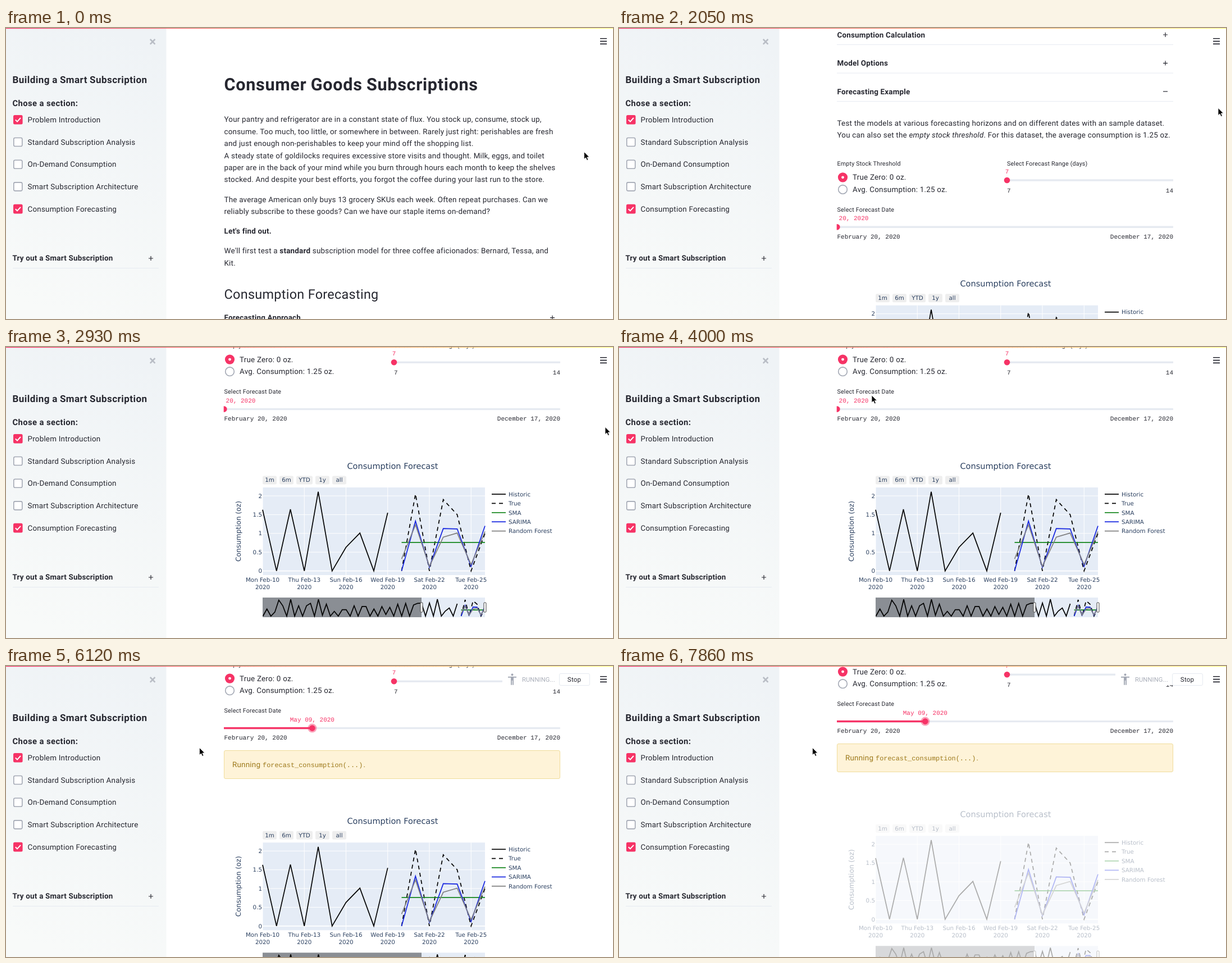
These frames come from a looping animation (1081 px wide and 518 px high, 8 s). An HTML page:

```html
<!DOCTYPE html>
<html lang="en">
<head>
<meta charset="utf-8">
<title>Consumer Goods Subscriptions</title>
<style>
  html, body { margin: 0; width: 100%; height: 100%; overflow: hidden; background: #fff; }
  svg { display: block; width: 1081px; height: 518px; }
  text { font: 13.4px Roboto, sans-serif; letter-spacing: .0165em; fill: #262730; text-rendering: geometricPrecision; white-space: pre; }
  .title { font-size: 30.6px; font-weight: 700; letter-spacing: .022em; word-spacing: -.03em; }
  .section { font-size: 23.4px; letter-spacing: .013em; }
  .side { font-size: 17px; font-weight: 700; letter-spacing: .0275em; word-spacing: -.03em; }
  .choose { font-size: 14.8px; font-weight: 700; letter-spacing: .0275em; }
  .strong { font-weight: 600; }
  .label { font-size: 10.7px; }
  .mono { font: 11px "Liberation Mono", monospace; letter-spacing: 0; }
  .code { font: 11.9px "Liberation Mono", monospace; letter-spacing: 0; }
  .pink { fill: #f63366; }
  .alert { fill: #926c05; fill-opacity: .9; }
  .status { font-size: 11.2px; letter-spacing: .01em; fill: #a9aeb9; }
  .stop { font-size: 11.5px; }
  .plot { font: 10.3px "DejaVu Sans", sans-serif; letter-spacing: 0; fill: #2a3f5f; }
  .axis { font-size: 12.2px; }
  .chart { font-size: 14.5px; }
  .mid { text-anchor: middle; }
  .end { text-anchor: end; }
  path, polyline { fill: none; }
</style>
</head>
<body>
<svg viewBox="0 0 1081 518" id="stage"></svg>
<script>
const LOOP = 8000;
const INK = '#262730', PINK = '#f63366', GREY = '#a3a8b4', RULE = '#e6eaf1';

// Drawing helpers
const text = (x, y, str, cls = '', attrs = '') => `<text x="${x}" y="${y}" class="${cls}" ${attrs}>${str}</text>`;
const rect = (x, y, w, h, fill, attrs = '') => `<rect x="${x}" y="${y}" width="${w}" height="${h}" fill="${fill}" ${attrs}/>`;
const circle = (x, y, r, fill, attrs = '') => `<circle cx="${x}" cy="${y}" r="${r}" fill="${fill}" ${attrs}/>`;
const path = (d, stroke, width, attrs = '') => `<path d="${d}" stroke="${stroke}" stroke-width="${width}" ${attrs}/>`;
const group = (id, body, attrs = '') => `<g id="${id}" ${attrs}>${body}</g>`;
const lines = (x, y, rows) => rows.map((row, i) => text(x, y + i * 21.45, row)).join('');
const plus = (x, y) => path(`M${x - 4} ${y}h8m-4 -4v8`, INK, 1.2);
const rule = (x, y, w) => path(`M${x} ${y}h${w}`, RULE, 1);

function expander(y, name, open) {
  const sign = open ? path(`M969 ${y - 4.6}h8`, INK, 1.2) : plus(973, y - 4.6);
  return text(388.5, y, name, 'strong') + sign + rule(388, y + 13, 599);
}

function checkbox(row, name, checked) {
  const y = 155 + row * 39.7;
  const box = checked
    ? rect(13, y, 16.6, 16.6, PINK, 'rx="2.5"') + path(`M16.8 ${y + 8.4}l3.2 3.2 6 -6.6`, '#fff', 2)
    : rect(13.8, y + .8, 15, 15, '#fff', `rx="2.3" stroke="${GREY}" stroke-width="1.6"`);
  return box + text(38.5, y + 13, name);
}

// Chart data: one value per day, day 0 is Feb 10
const earlier = [0, .9, 0, .5, 2, 1.3, 0, 2.1, 0, 1.3, 0, 1.3, 1.6, 0, 2.1, .1, 1.5, 0, .6, 0,
  .8, .8, 0, 1.3, 0, 1.2, 1.2, 0, .9, 0, 1.2, .2, 1.1, 0, 1.5, 0, 1.6, 0, 1.4, 1.6];
const series = [
  { name: 'Historic', color: '#000', start: 0, values: [1.63, 0, 1.64, 0, 2.11, 0, .63, 1.01, 0, 1.55] },
  { name: 'True', color: '#000', dash: '7 6', start: 10, values: [0, 2.05, 0, 1.9, 1.5, 0, 1] },
  { name: 'SMA', color: '#14861c', start: 10, values: Array(7).fill(.76) },
  { name: 'SARIMA', color: '#1424e0', start: 10, values: [0, 1.33, .1, 1.13, 1.12, .12, 1.2] },
  { name: 'Random Forest', color: '#808080', start: 10, values: [.32, 1.23, .12, .9, 1.01, .17, 1.05] },
];
const stroke = s => `stroke="${s.color}" stroke-width="1.7" stroke-dasharray="${s.dash || 'none'}"`;

function curve(s, values, start, x0, dx, y0, dy) {
  const points = values.map((v, i) => `${x0 + (start + i) * dx},${y0 - v * dy}`).join(' ');
  return `<polyline points="${points}" ${stroke(s)}/>`;
}

function chart() {
  let out = text(688.5, 216.8, 'Consumption Forecast', 'plot chart mid');
  [['1m', 457, 25], ['6m', 487, 25], ['YTD', 517, 29], ['1y', 551, 25], ['all', 581, 25]].forEach(([name, x, w]) => {
    out += rect(x, 229.5, w, 15, '#eee', 'rx="2.5"') + text(x + w / 2, 240.3, name, 'plot mid');
  });
  out += rect(457, 250, 396, 156, '#e5ecf6');
  ['Mon Feb-10', 'Thu Feb-13', 'Sun Feb-16', 'Wed Feb-19', 'Sat Feb-22', 'Tue Feb-25'].forEach((day, i) => {
    const x = 457 + i * 74.25;
    out += path(`M${x} 250v156`, '#fff', 1) + text(x, 418, day, 'plot mid') + text(x, 431, '2020', 'plot mid');
  });
  for (let v = 0; v <= 2; v += .5) {
    const y = 398.6 - v * 66.8;
    out += path(`M457 ${y}h396`, '#fff', v ? 1 : 1.7) + text(456, y + 3.7, v, 'plot end');
  }
  out += text(0, 0, 'Consumption (oz)', 'plot axis mid', 'transform="translate(418 328) rotate(-90)"');
  series.forEach((s, i) => {
    const y = 262 + i * 16.4;
    out += curve(s, s.values, s.start, 457, 24.75, 398.6, 66.8);
    out += `<path d="M865 ${y}h25" ${stroke(s)}/>` + text(895, y + 3.8, s.name, 'plot');
  });
  // Range slider
  out += rect(457, 446, 396, 35, '#e5ecf6');
  series.forEach((s, i) => {
    out += i ? curve(s, s.values, s.start, 740, 7.06, 479, 14.2)
             : curve(s, earlier.concat(s.values), -40, 740, 7.06, 479, 14.2);
  });
  out += rect(457, 446, 283, 35, '#000', 'fill-opacity=".4"');
  [740, 853].forEach(x => out += rect(x - 2, 455, 4, 17, '#fff', 'rx="1" stroke="#444" stroke-width="1"'));
  return out;
}

const intro =
  text(388.5, 111.3, 'Consumer Goods Subscriptions', 'title') +
  lines(388.5, 167.2, [
    'Your pantry and refrigerator are in a constant state of flux. You stock up, consume, stock up,',
    'consume. Too much, too little, or somewhere in between. Rarely just right: perishables are fresh',
    'and just enough non-perishables to keep your mind off the shopping list.',
    'A steady state of goldilocks requires excessive store visits and thought. Milk, eggs, and toilet',
    'paper are in the back of your mind while you burn through hours each month to keep the shelves',
    'stocked. And despite your best efforts, you forgot the coffee during your last run to the store.']) +
  lines(388.5, 309.6, [
    'The average American only buys 13 grocery SKUs each week. Often repeat purchases. Can we',
    'reliably subscribe to these goods? Can we have our staple items on-demand?']) +
  text(388.5, 366.2, "Let's find out.", 'strong') +
  lines(388.5, 401.4, [
    'We\'ll first test a <tspan class="strong">standard</tspan> subscription model for three coffee aficionados: Bernard, Tessa, and',
    'Kit.']) +
  text(388.5, 482, 'Consumption Forecasting', 'section') +
  expander(520.3, 'Forecasting Approach');

const example =
  expander(16.6, 'Consumption Calculation') +
  expander(67.2, 'Model Options') +
  expander(117.6, 'Forecasting Example', true) +
  lines(388.5, 174, [
    'Test the models at various forecasting horizons and on different dates with an sample dataset.',
    'You can also set the <tspan font-style="italic">empty stock threshold</tspan>. For this dataset, the average consumption is 1.25 oz.']) +
  text(388.5, 244.5, 'Empty Stock Threshold', 'label') +
  circle(398.5, 265.8, 8.6, PINK) + circle(398.5, 265.8, 2.4, '#fff') +
  text(416, 270.4, 'True Zero: 0 oz.') +
  circle(398.5, 287.4, 7.8, '#fff', `stroke="${GREY}" stroke-width="1.6"`) +
  text(416, 292, 'Avg. Consumption: 1.25 oz.') +
  text(691, 244.5, 'Select Forecast Range (days)', 'label') +
  text(691, 259, '7', 'mono pink mid') +
  rect(691, 269.3, 296, 3.4, RULE) + circle(691, 271, 5.3, PINK) +
  text(691, 292.6, '7', 'mono') + text(987, 292.6, '14', 'mono end') +
  text(388.5, 327, 'Select Forecast Date', 'label') +
  `<g clip-path="url(#column)">` +
    rect(388, 352.6, 599, 3.4, RULE, 'rx="1"') + rect(388, 352.6, 0, 3.4, PINK, 'id="fill"') +
    circle(388, 354.3, 8, PINK, 'id="halo" fill-opacity=".45"') + circle(388, 354.3, 5.3, PINK, 'id="thumb"') +
    text(388, 342.4, '', 'mono pink mid', 'id="date"') +
  '</g>' +
  text(388.5, 375, 'February 20, 2020', 'mono') + text(987, 375, 'December 17, 2020', 'mono end') +
  group('alert',
    rect(388.5, 394.2, 598, 50, '#fef3d8', 'rx="2.5" stroke="#f0dc9a"') +
    text(403, 424, 'Running', 'alert') +
    text(457, 424, 'forecast_consumption(...)', 'code alert') + text(636.5, 424, '.', 'alert')) +
  group('chart', chart());

const sidebar =
  rect(0, 0, 285.5, 518, 'url(#shade)') +
  path('M256.8 20l8.6 8.8m0 -8.8l-8.6 8.8', '#b9bdc5', 2.6) +
  text(11.5, 97.6, 'Building a Smart Subscription', 'side') +
  text(11.5, 138.6, 'Chose a section:', 'choose') +
  ['Problem Introduction', 'Standard Subscription Analysis', 'On-Demand Consumption',
    'Smart Subscription Architecture', 'Consumption Forecasting']
    .map((name, i) => checkbox(i, name, i % 4 === 0)).join('') +
  text(11.5, 414.3, 'Try out a Smart Subscription', 'strong') + plus(258, 410) + rule(12, 427.5, 260);

const status =
  rect(884, 12.5, 166, 21.5, '#fff') +
  circle(901.5, 15.6, 2, GREY) +
  path('M894 19.8h15', GREY, 1.9) + path('M901.5 19.8v6', GREY, 5) +
  path('', GREY, 1.9, 'id="legs"') +
  text(919, 28, 'RUNNING...', 'status') +
  rect(985.5, 13.5, 54, 21, '#fff', `rx="2.5" stroke="${RULE}"`) + text(1012, 27.8, 'Stop', 'stop mid');

const arrow = '<path d="M0 0v13l3 -2.7 2.2 4.7 2.2 -1 -2.1 -4.5 4 -.2z" style="fill:#000" stroke="#fff" stroke-width=".8"/>';
const hand = '<path d="M-4 5.5C-6.5 2 -6 -1 -3.8 -1V-3.5Q-2.5 -5.5 -1 -4.3Q.5 -6 1.8 -4.3Q3.5 -5 4 -3Q5.6 -3 5.4 0L4 5.5z" style="fill:#fff" stroke="#000" stroke-width="1"/>' +
  path('M-1.2 -2v2.6m2.4 -2.6v2.6m2.3 -2.6v2.6', '#000', .7);

const stage = document.getElementById('stage');
stage.innerHTML = `<defs>
    <linearGradient id="bar"><stop stop-color="${PINK}"/><stop offset="1" stop-color="#fffd80"/></linearGradient>
    <linearGradient id="shade" x1=".6" y1="0" x2=".4" y2="1"><stop stop-color="#eff3f6"/><stop offset="1" stop-color="#f8faf9"/></linearGradient>
    <clipPath id="column"><rect x="387.7" y="300" width="600" height="80"/></clipPath>
  </defs>` +
  rect(0, 0, 1081, 518, '#fff') +
  group('page', intro + group('example', example, 'transform="translate(0 554.3)"')) +
  group('status', status) +
  path('M1058 18.8h12m-12 4.8h12m-12 4.8h12', INK, 1.6) +
  sidebar +
  rect(0, 0, 1081, 1.2, 'url(#bar)') +
  group('arrow', arrow) + group('hand', hand);

const $ = id => document.getElementById(id);
const set = (id, attrs) => Object.entries(attrs).forEach(([key, value]) => $(id).setAttribute(key, value));
const show = (id, visible) => $(id).style.display = visible ? '' : 'none';

// Held steps: [time, ...state]
const scrollSteps = [[0, 0], [1670, 3.5], [1760, 70], [1860, 240], [1950, 430], [2050, 554.3], [2460, 559],
  [2550, 620], [2650, 710], [2740, 774], [2930, 798], [7090, 801], [7190, 805], [7280, 809], [7480, 810]];
const daySteps = [[0, 0], [4660, 4], [4760, 17], [4860, 41], [4960, 65], [5060, 76], [5150, 79]];
const pointerSteps = [[0, 'arrow', 1029.5, 220.5], [400, 'arrow', 1037, 202], [480, 'none', 0, 0], [980, 'arrow', 1067, 142.5],
  [3430, 'arrow', 1052, 120], [3530, 'arrow', 985, 78], [3620, 'arrow', 880, 50], [3710, 'arrow', 760, 42],
  [3810, 'arrow', 640, 48], [3900, 'arrow', 530, 66], [4000, 'arrow', 450, 86], [4090, 'arrow', 405, 98],
  [4190, 'hand', 394, 104], [4660, 'hand', 404, 104], [4760, 'hand', 434, 104], [4860, 'hand', 482, 104],
  [4960, 'hand', 528, 104], [5060, 'hand', 547, 104], [5150, 'hand', 550.5, 104],
  [5440, 'arrow', 340, 151], [5550, 'arrow', 344.5, 145.5]];
const stepAt = (steps, t) => steps.filter(step => step[0] <= t).pop();

const formatDate = days => new Date(Date.UTC(2020, 1, 20 + days))
  .toLocaleDateString('en-US', { month: 'long', day: '2-digit', year: 'numeric', timeZone: 'UTC' });

function render(t) {
  set('page', { transform: `translate(0 ${-stepAt(scrollSteps, t)[1]})` });

  const days = stepAt(daySteps, t)[1], x = 388.3 + days * 1.988;
  set('fill', { width: x - 388 });
  set('thumb', { cx: x });
  set('halo', { cx: x });
  set('date', { x });
  $('date').textContent = formatDate(days);
  show('halo', t >= 4660);

  const running = t >= 6020;
  const fade = Math.min(1, Math.max(0, (t - 6050) / 1000)) ** 1.7;
  show('alert', running);
  set('chart', { transform: `translate(0 ${running ? 308 : 243.7})`, opacity: 1 - .67 * fade });

  show('status', t >= 5730);
  set('status', { opacity: t < 5830 ? .5 : 1 });
  const striding = t >= 7770 && t < 7860;
  set('legs', { d: striding ? 'M900.5 25l-4.5 8m6.5 -8l4.5 8' : 'M900 25v8.8m3 -8.8v8.8' });

  const [, shape, px, py] = stepAt(pointerSteps, t);
  for (const id of ['arrow', 'hand']) {
    show(id, id === shape);
    set(id, { transform: `translate(${px} ${py})` });
  }
}

const begin = performance.now();
(function frame() {
  render((performance.now() - begin) % LOOP);
  requestAnimationFrame(frame);
})();
</script>
</body>
</html>
```
